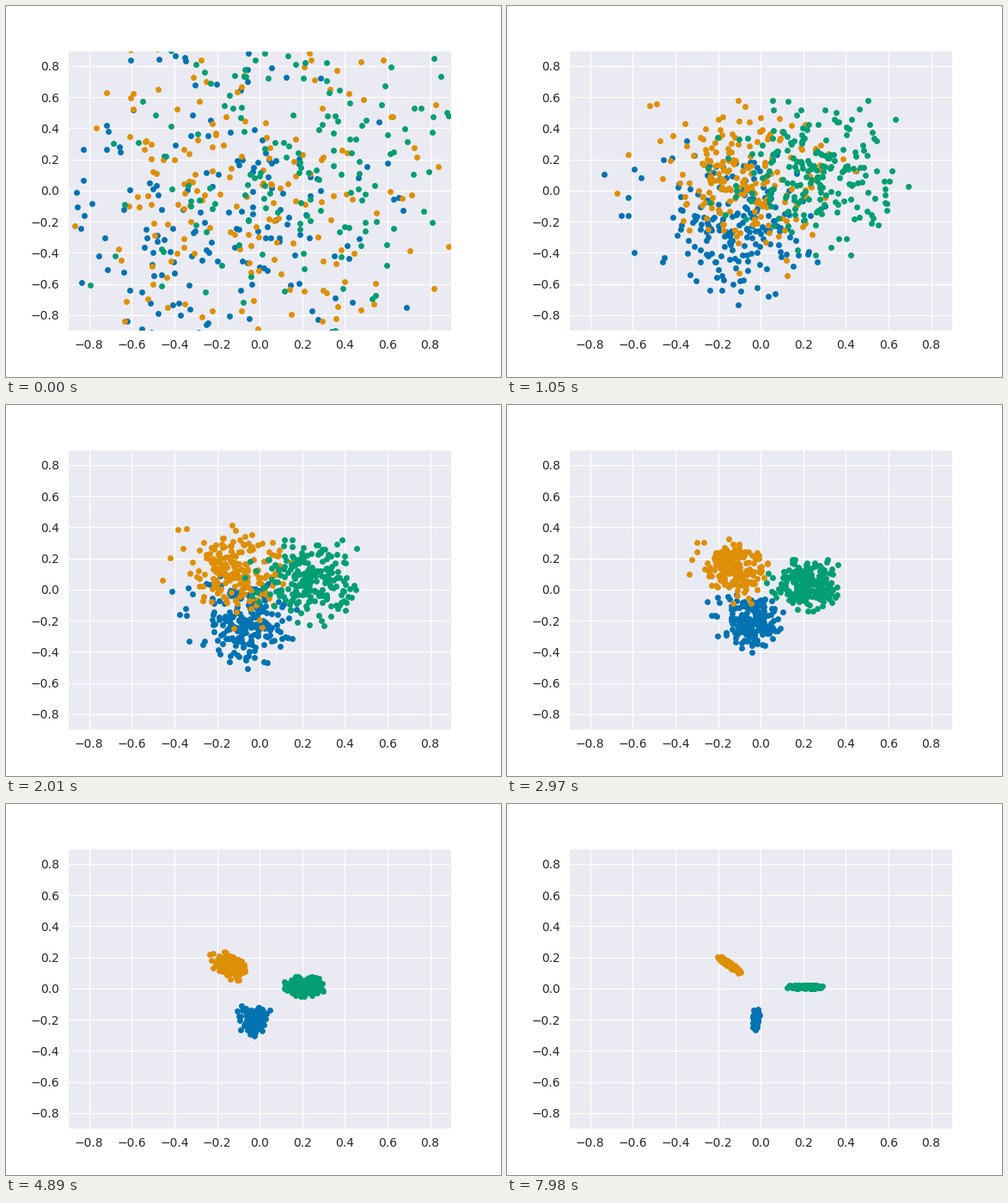
A matplotlib script that plays this animation: 576 px wide and 432 px high, repeating every 8 s.

```python
import numpy as np
import matplotlib.pyplot as plt
from matplotlib.animation import FuncAnimation

LOOP, TICK, STEP = 8000, 20, 30   # ms
POINTS = 200                      # per class

plt.rcParams["font.family"] = "DejaVu Sans"
rng = np.random.default_rng(12)


def decay(t, tau):
    return np.exp(-t / tau)


def spread(t):
    """Standard deviation of a class: a fast fall, then a slow one."""
    return 0.30 * decay(t, 2000) + 0.19 * decay(t, 500)


class Cluster:
    """Points that drift to a centre and keep only a spread along one axis."""

    def __init__(self, color, center, offset, axis, length):
        self.color = color
        self.center = np.array(center)
        self.offset = np.array(offset)
        stretch = np.clip(rng.normal(size=(POINTS, 1)), -2.4, 2.4) * length
        self.along = stretch * np.array(axis)
        self.dev = rng.normal(size=(POINTS, 2))
        self.early = rng.normal(size=(POINTS, 2))

    def at(self, t):
        middle = self.center + self.offset * decay(t, 1350)
        shake = 0.2 * decay(t, 400) * self.early
        return middle + self.along + spread(t) * self.dev + shake


clusters = [
    Cluster("#0173b2", (-0.022, -0.203), (-0.22, -0.03), (0.06, 0.998), 0.027),
    Cluster("#de8f05", (-0.145, 0.153), (0.12, -0.14), (-0.72, 0.69), 0.028),
    Cluster("#029e73", (0.207, 0.011), (0.12, 0.21), (1, 0), 0.035),
]

fig = plt.figure(figsize=(5.76, 4.32), dpi=100, facecolor="white")
ax = fig.add_axes([0.125, 0.125, 0.775, 0.755], facecolor="#eaeaf2")
ax.set(xlim=(-0.9, 0.9), ylim=(-0.9, 0.9))
ticks = np.arange(-4, 5) * 0.2
ax.set_xticks(ticks)
ax.set_yticks(ticks)
ax.tick_params(length=0, pad=7, labelsize=10, labelcolor="0.15")
ax.grid(color="white", linewidth=0.8)
ax.set_axisbelow(True)
for spine in ax.spines.values():
    spine.set(color="white", linewidth=0.8)

dots = [ax.plot([], [], "o", color=c.color, ms=5, mew=0)[0] for c in clusters]


def update(i):
    t = i * TICK // STEP * STEP
    for dot, cluster in zip(dots, clusters):
        dot.set_data(*cluster.at(t).T)
    return dots


anim = FuncAnimation(fig, update, frames=LOOP // TICK, interval=TICK,
                     repeat=True, repeat_delay=0)
plt.show()
```
